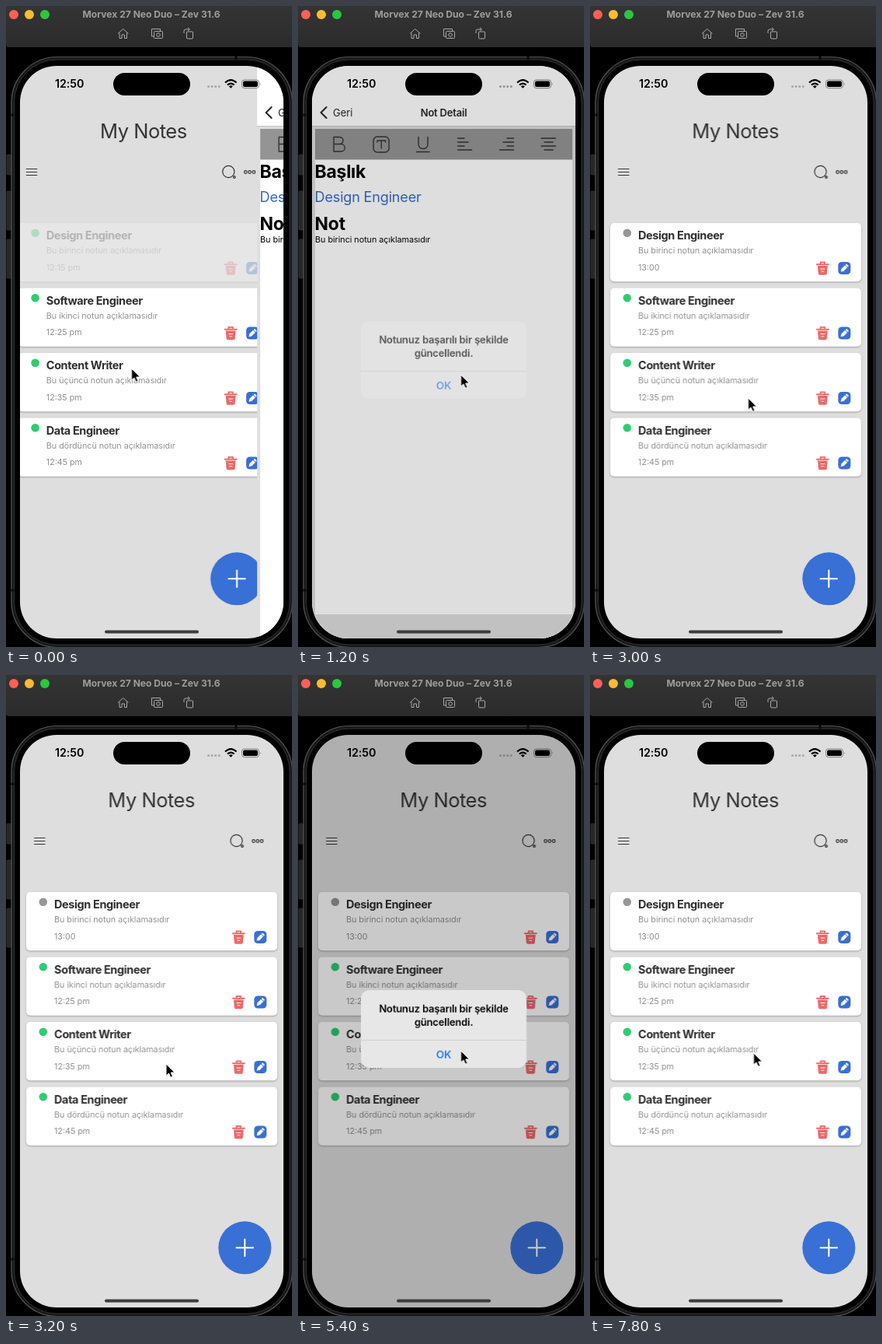
Animation, 368 px wide and 824 px high, one loop 8 s. Source, as an HTML page:

```html
<!DOCTYPE html>
<html lang="tr">
<head>
<meta charset="utf-8">
<title>My Notes</title>
<style>
  html, body { margin: 0; width: 100%; height: 100%; overflow: hidden; background: #000; }
  svg { display: block; width: 368px; height: 824px; font-family: Inter, Roboto, sans-serif; }
  .line { fill: none; stroke: #333; stroke-width: 1.2; stroke-linecap: round; stroke-linejoin: round; }
  .bar { fill: none; stroke: #a9a9a9; stroke-width: 1; stroke-linejoin: round; }
  .card > rect { fill: #fff; filter: drop-shadow(0 1px 1.3px rgba(0, 0, 0, .28)); }
  .name { font-size: 14.5px; font-weight: 700; letter-spacing: -.4px; fill: #303030; }
  .desc { font-size: 10.8px; letter-spacing: -.04px; fill: #929292; }
  .time { font-size: 10.7px; fill: #8c8c8c; }
  .head { font-size: 23px; font-weight: 700; letter-spacing: -.3px; }
  .msg { font-size: 13px; font-weight: 600; letter-spacing: -.15px; text-anchor: middle; }
  #alert { transform-origin: 187.5px 455px; }
</style>
</head>
<body>
<svg viewBox="0 0 368 824">
  <defs>
    <clipPath id="glass"><rect x="18" y="77" width="339" height="736" rx="47"/></clipPath>
    <linearGradient id="chrome" x2="0" y2="1">
      <stop stop-color="#343434"/><stop offset="1" stop-color="#2b2b2b"/>
    </linearGradient>
    <g id="trash">
      <path d="M-7.5-4.8H7.5M-2.6-5V-7.6H2.6V-5" fill="none" stroke="#ec6868" stroke-width="1.9" stroke-linecap="round"/>
      <path d="M-6.4-3H6.4L5.5 7Q5.3 8.7 3.7 8.7H-3.7Q-5.3 8.7-5.5 7Z" fill="#ec6868"/>
      <path d="M-2.8 1H2.8M-1.8 4.2H1.8" stroke="#fff" stroke-width="1.1"/>
    </g>
    <g id="edit">
      <rect x="-8" y="-8" width="16" height="16" rx="4.5" fill="#396fd5"/>
      <g transform="rotate(45)" fill="#fff">
        <path d="M-2.1-3.2H2.1V3.2L0 6.6L-2.1 3.2Z"/>
        <rect x="-2.1" y="-6" width="4.2" height="2" rx=".8"/>
      </g>
    </g>
  </defs>

  <!-- Simulator window -->
  <rect width="368" height="824"/>
  <path d="M0 0H368V53H4Q0 53 0 49Z" fill="url(#chrome)"/>
  <circle cx="10" cy="11" r="6" fill="#ff5f57"/>
  <circle cx="30" cy="11" r="6" fill="#febc2e"/>
  <circle cx="50" cy="11" r="6" fill="#28c840"/>
  <text x="187" y="15" text-anchor="middle" font-size="12.1" font-weight="700" fill="#9d9d9d">Morvex 27 Neo Duo – Zev 31.6</text>
  <g class="bar">
    <path d="M144 35.5L150.700 29.500L157.500 35.500M146 34.500V41.500H149V37H152.500V41.500H155.500V34.500"/>
    <path d="M190 39H187.500V29.500H198.500V32"/>
    <rect x="190.500" y="32.500" width="11" height="9" rx="1"/>
    <circle cx="196" cy="37" r="2.300"/>
    <rect x="232.500" y="33" width="8" height="9" rx="1"/>
    <path d="M229 35V32Q229 30 231 30H236M234 27.700L236.500 30L234 32.300"/>
  </g>

  <!-- Phone body -->
  <g fill="#272727" stroke="#3a3a3a" stroke-width=".6">
    <rect x="1" y="191" width="6" height="26" rx="1"/>
    <rect x="1" y="238" width="6" height="50" rx="1"/>
    <rect x="1" y="300" width="6" height="50" rx="1"/>
  </g>
  <rect x="7" y="65.500" width="361.500" height="759" rx="59" fill="#181818" stroke="#555" stroke-width="1.200"/>
  <rect x="10.500" y="69" width="354.500" height="752" rx="55" stroke="#343434"/>
  <path d="M296 65V69M6.500 140H10.500M6.500 751H10.500" stroke="#0a0a0a" stroke-width="3"/>

  <g clip-path="url(#glass)">
    <rect x="18" y="77" width="339" height="736" fill="#dedede"/>
    <g id="list">
      <text x="187" y="169.500" text-anchor="middle" font-size="25.500" letter-spacing="-.5" fill="#333">My Notes</text>
      <path class="line" d="M36.500 209.500H50M36.500 213.500H50M36.500 217.500H50"/>
      <g class="line">
        <circle cx="296.500" cy="213" r="7.600"/>
        <circle cx="304" cy="220" r="1.300"/>
        <circle cx="318.500" cy="213.500" r="1.800"/>
        <circle cx="323.800" cy="213.500" r="1.800"/>
        <circle cx="329.100" cy="213.500" r="1.800"/>
      </g>
      <g id="cards"></g>
      <circle cx="307.300" cy="736.300" r="34" fill="#3970d6"/>
      <path d="M296.500 736.300H318M307.300 725.500V747" stroke="#fff" stroke-width="2" stroke-linecap="round"/>
    </g>

    <g id="detail">
      <rect x="18" y="77" width="339" height="77.500" fill="#fff"/>
      <rect x="18" y="154" width="339" height="659" fill="#dedede"/>
      <path d="M18 154.500H357" stroke="#c4c4c4"/>
      <rect x="22" y="197" width="331" height="616" fill="#fff"/>
      <rect id="footer" x="18" y="782" width="339" height="31" fill="#dedede"/>
      <rect x="22" y="158" width="331" height="39.500" fill="#949494"/>
      <g id="back">
        <path d="M36.500 130L29.500 137L36.500 144" fill="none" stroke="#222" stroke-width="1.900" stroke-linecap="round" stroke-linejoin="round"/>
        <text x="45" y="141.500" font-size="12.900" fill="#222">Geri</text>
      </g>
      <text x="187.500" y="141.500" text-anchor="middle" font-size="12.900" font-weight="600" letter-spacing="-.15" fill="#222">Not Detail</text>
      <g class="line" style="stroke-width:1.400">
        <path d="M46 168.500H53.500A4.500 4.500 0 0 1 53.500 177.500H46M53.500 177.500H55.500A4.700 4.700 0 0 1 55.500 187H46V168.500"/>
        <rect x="97" y="168" width="20" height="20" rx="5"/>
        <path d="M102 175V173H112.500V175M107.200 173V183"/>
        <path d="M155 168.500V177Q155 183.500 161 183.500T167 177V168.500M152.500 187.500H169"/>
        <path d="M205.500 170H214M205.500 175H219M205.500 180H214M205.500 185H223.500"/>
        <path d="M269 170H277.500M264 175H277.500M269 180H277.500M259.500 185H277.500"/>
        <path d="M313 170H331.500M317 175H328M313 180H331.500M317 185H328"/>
      </g>
      <text class="head" x="21.500" y="220.500">Başlık</text>
      <text x="21.500" y="252" font-size="18.100" letter-spacing="-.2" fill="#3468c8">Design Engineer</text>
      <text class="head" x="21.500" y="287.500">Not</text>
      <text class="desc" x="22" y="303.500" style="fill:#000">Bu birinci notun açıklamasıdır</text>
    </g>

    <!-- Status bar -->
    <text x="81.700" y="105.300" text-anchor="middle" font-size="14.300" font-weight="600" letter-spacing="-.1">12:50</text>
    <g id="signal" fill="#a8a8a8"></g>
    <g fill="none" stroke="#000" stroke-width="2.100">
      <path d="M282 98.600Q289.300 91.600 296.600 98.600M284.900 101.500Q289.300 97.600 293.700 101.500"/>
    </g>
    <path d="M289.300 105.800L286.800 103.200Q289.300 101.200 291.800 103.200Z"/>
    <rect x="303.500" y="95" width="22" height="10.600" rx="3.200" fill="none" stroke="#777" stroke-width=".9"/>
    <rect x="305" y="96.500" width="19" height="7.600" rx="2"/>
    <path d="M327 98.500Q328.500 100.300 327 102Z" fill="#777"/>

    <rect id="dim" x="18" y="77" width="339" height="736"/>
    <rect x="138" y="86" width="99" height="29" rx="14.500"/>
    <rect x="127" y="802.500" width="121" height="4" rx="2" fill="#3d3d3d"/>

    <g id="alert">
      <rect x="81" y="405" width="213" height="100" rx="11" fill="#e7e7e7"/>
      <path id="press" d="M81 469.500H294V494A11 11 0 0 1 283 505H92A11 11 0 0 1 81 494Z" fill="#cfcfcf"/>
      <path d="M81 469.500H294" stroke="#c8c8c8" stroke-width=".8"/>
      <text class="msg" x="187.500" y="433.500">Notunuz başarılı bir şekilde</text>
      <text class="msg" x="187.500" y="451">güncellendi.</text>
      <text class="msg" x="187.500" y="492.500" style="fill:#2a7de8;font-size:13.500px">OK</text>
    </g>
  </g>

  <path id="cursor" d="M0 0V15.200L3.500 12L5.900 17.300L8.500 16.200L6.200 11H11Z" fill="#000" stroke="#fff" stroke-width="1" stroke-linejoin="round"/>
</svg>

<script>
const LOOP = 8000;
const $ = id => document.getElementById(id);

const notes = [
  ['Design Engineer', 'birinci', '12:15 pm'],
  ['Software Engineer', 'ikinci', '12:25 pm'],
  ['Content Writer', 'üçüncü', '12:35 pm'],
  ['Data Engineer', 'dördüncü', '12:45 pm']
];

$('cards').innerHTML = notes.map(([name, ordinal, time], i) => `
  <g class="card" id="card${i}" transform="translate(0 ${i * 83.5})">
    <rect x="26" y="279" width="323" height="75.300" rx="5"/>
    <circle cx="47.800" cy="291.800" r="5.300" fill="#2ecc71"/>
    <text class="name" x="62" y="300.300">${name}</text>
    <text class="desc" x="62" y="318">Bu ${ordinal} notun açıklamasıdır</text>
    <text class="time" x="62" y="339.500">${time}</text>
    <use href="#trash" x="299.300" y="337"/>
    <use href="#edit" x="327.300" y="337"/>
  </g>`).join('');

$('signal').innerHTML = [0, 1, 2, 3]
  .map(i => `<circle cx="${260.500 + i * 4.600}" cy="103.500" r="1.500"/>`).join('');

const note = $('card0');
note.querySelector('.time').insertAdjacentHTML('afterend',
  '<text class="time" id="edited" x="62" y="339.500">13:00</text>');
note.querySelector('.time').id = 'created';
note.querySelector('circle').id = 'status';

// Each step is [time in ms, value]; values hold until the next step.
function track(id, steps, style) {
  const frames = steps.map(([time, ...value]) => ({
    offset: time / LOOP, easing: 'steps(1, end)', ...style(...value)
  }));
  frames.push({ ...frames[frames.length - 1], offset: 1 });
  $(id).animate(frames, { duration: LOOP, iterations: Infinity });
}

const opacity = value => ({ opacity: value });
const move = (x, y = 0) => ({ transform: `translate(${x}px, ${y}px)` });

// Share of the screen width by which the detail page is still off to the right.
const slide = [[0, .9], [600, 0], [2600, .5], [2800, .96], [3000, 1]];
track('detail', slide, p => move(339 * p));
track('list', slide, p => move(-102 * (1 - p)));

track('card0', [[0, .25], [600, 1]], opacity);
track('footer', [[0, 0], [600, 1]], opacity);
track('created', [[0, 1], [1600, 0]], opacity);
track('edited', [[0, 0], [1600, 1]], opacity);
track('status', [[0, '#2ecc71'], [1600, '#969696']], fill => ({ fill }));
track('back', [[0, 1], [2400, .2]], opacity);

const alert = [
  [0, 0, 1], [800, 1, 1], [1200, .62, 1], [1400, .06, 1], [1600, 0, 1],
  [3600, .4, 1.1], [3800, .9, 1.02], [4000, 1, 1],
  [7400, .6, 1], [7600, .06, 1], [7800, 0, 1]
];
track('alert', alert, (shown, scale) => ({ opacity: shown, transform: `scale(${scale})` }));
track('dim', alert, shown => opacity(.21 * shown));
track('press', [[0, 0], [1000, 1], [1200, 0], [6600, 1], [7400, 0]], opacity);

track('cursor', [
  [0, 161.500, 466], [600, 180, 470], [800, 209.500, 474],
  [1600, 205, 460], [1800, 160, 350], [2000, 95, 200], [2200, 57, 135], [2400, 57, 132],
  [2600, 90, 220], [2800, 165, 420], [3000, 203.500, 504],
  [3200, 206, 500], [3400, 208, 490], [3600, 209.500, 483], [6400, 210.500, 486]
], move);
</script>
</body>
</html>
```
